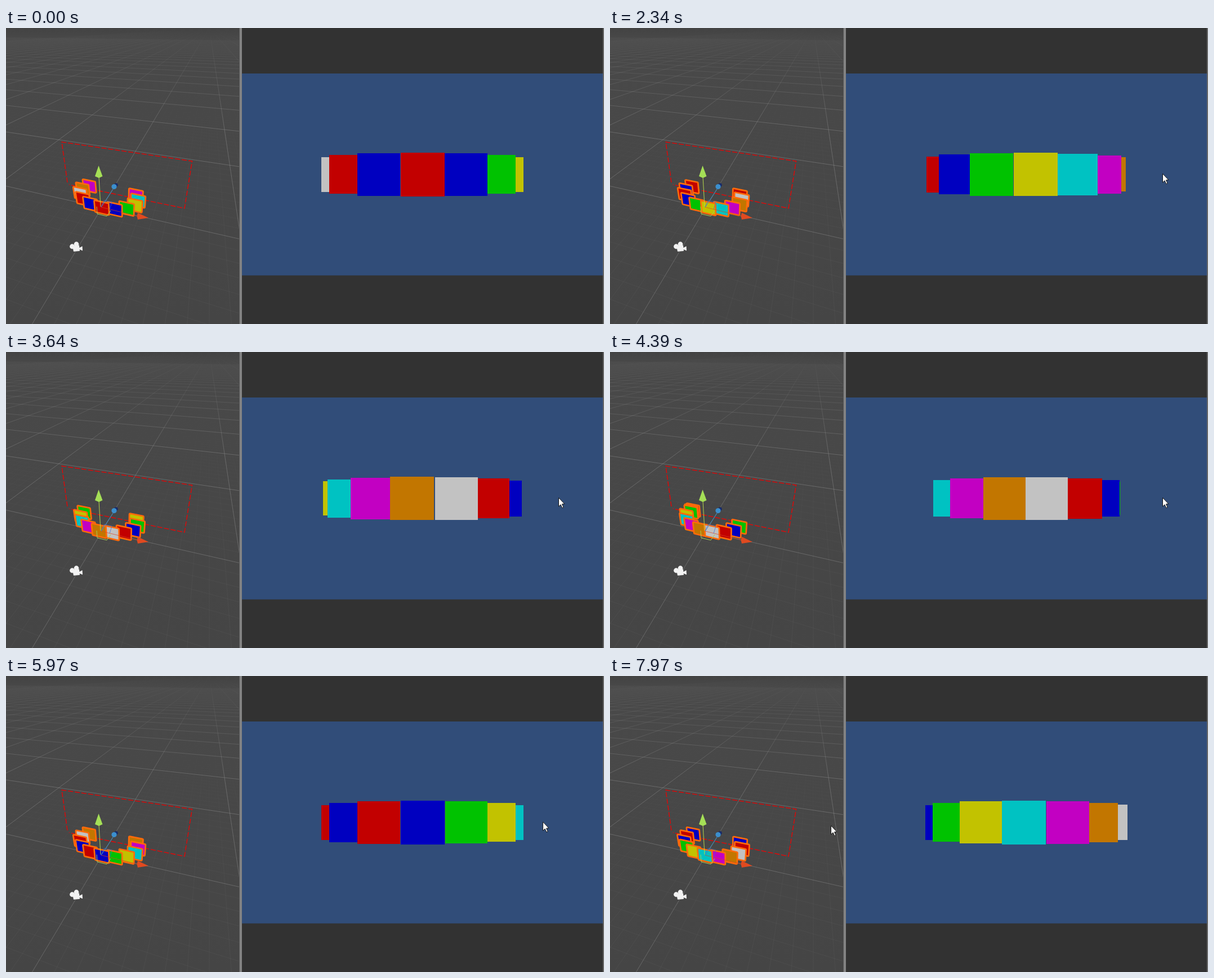
Animation, 1062 px wide and 527 px high, one loop 8 s. Source, as an HTML page with a canvas:

```html
<!DOCTYPE html>
<html lang="en">
<head>
<meta charset="utf-8">
<title>Card carousel</title>
<style>
html, body { margin: 0; width: 100%; height: 100%; overflow: hidden; background: #323232; }
canvas { display: block; }
</style>
</head>
<body>
<canvas id="stage" width="1062" height="527"></canvas>
<script>
const LOOP = 8000;
const ctx = document.getElementById('stage').getContext('2d');
const COLORS = ['#c20000', '#0000c0', '#00c200', '#c2c200', '#00c2c2', '#c200c2', '#c27600', '#c2c2c2'];
const RADIUS = 2.5, STEP = 24.3 * Math.PI / 180, SIDE = 5;

// The carousel turns at a steady rate, in hops of one or two slots
const RUNS = [
  { start: 1285, end: 4110, from: 0, to: 7.47, hop: 1 },
  { start: 4110, end: 5970, from: 7.47, to: 1, hop: 2 },
  { start: 5970, end: 6270, from: 1, to: 0, hop: 1 },
  { start: 6690, end: 8000, from: 0, to: 4.15, hop: 1 }
];
const ENTRY = { x: 968, y: 495 };
const MOVES = [
  { start: 120, end: 260, x: 958, y: 304 },
  { start: 490, end: 580, x: 981, y: 259 },
  { start: 5885, end: 6280, x: 392, y: 266 }
];

const clamp = (v, lo, hi) => Math.min(hi, Math.max(lo, v));
const mix = (a, b, k) => a + (b - a) * k;
const progress = (t, { start, end }) => clamp((t - start) / (end - start), 0, 1);

function path(c, pts, close) {
  c.beginPath();
  pts.forEach(([x, y], i) => i ? c.lineTo(x, y) : c.moveTo(x, y));
  if (close) c.closePath();
}

function line(c, pts, color, width = 1) {
  path(c, pts);
  c.strokeStyle = color;
  c.lineWidth = width;
  c.stroke();
}

function shape(c, pts, color) {
  path(c, pts, true);
  c.fillStyle = color;
  c.fill();
}

function disc(c, x, y, r, color) {
  c.beginPath();
  c.arc(x, y, r, 0, 7);
  c.fillStyle = color;
  c.fill();
}

// World to editor view
function project(x, y, z) {
  const w = 1 - .0149 * x + .0459 * z - .0326 * y;
  return [(170 + 18.5 * x + 16.57 * z - 6.78 * y) / w, (320 - 27.4 * y) / w];
}

function fade(c, from, to, alpha) {
  const g = c.createLinearGradient(0, from, 0, to);
  g.addColorStop(0, 'rgba(150,150,150,0)');
  g.addColorStop(1, `rgba(150,150,150,${alpha})`);
  return g;
}

function drawGrid(c) {
  const minor = fade(c, 100, 420, .08), major = fade(c, 4, 190, .42);
  const xVanish = -1239, zVanish = 361;
  for (let z = -12; z <= 300; z++) {
    const big = z % 10 === 0;
    if (!big && z > 40) continue;
    const [px, py] = project(0, 0, z);
    const slope = py / (px - xVanish);
    line(c, [[0, -slope * xVanish], [416, slope * (416 - xVanish)]], big ? major : minor);
  }
  for (let x = -200; x < 60; x++) {
    const big = x % 10 === 0;
    if (!big && x < -60) continue;
    const [px, py] = project(x, 0, 0);
    const k = 540 / py;
    line(c, [[zVanish, 0], [zVanish + (px - zVanish) * k, 540]], big ? major : minor);
  }
}

function makeBackdrop() {
  const back = document.createElement('canvas');
  back.width = 1062;
  back.height = 527;
  const c = back.getContext('2d');
  const rect = (x, y, w, h, color) => { c.fillStyle = color; c.fillRect(x, y, w, h); };
  rect(0, 0, 1062, 527, '#323232');
  const g = c.createLinearGradient(0, 0, 0, 527);
  g.addColorStop(0, '#434343');
  g.addColorStop(.04, '#494949');
  g.addColorStop(1, '#454545');
  rect(0, 0, 415, 527, g);
  c.save();
  c.beginPath();
  c.rect(0, 0, 415, 527);
  c.clip();
  drawGrid(c);
  c.restore();
  rect(414, 0, 1, 527, '#555');
  rect(415, 0, 4, 527, '#838383');
  rect(419, 81, 641, 359.5, '#314d79');
  rect(1060, 0, 2, 527, '#6a6a6a');
  return back;
}

const backdrop = makeBackdrop();

// Current hop: slot a to slot b, k of the way
function turn(t) {
  const run = RUNS.filter(r => t >= r.start).pop() || RUNS[0];
  const { from, to, hop } = run;
  const pos = mix(from, to, progress(t, run));
  const base = Math.min(from, to);
  const low = base + hop * Math.floor((pos - base) / hop);
  const [a, b] = to > from ? [low, low + hop] : [low + hop, low];
  return { pos, a, b, k: Math.abs(pos - a) / hop };
}

function slot(offset) {
  const angle = STEP * clamp(offset, -SIDE, SIDE);
  return { x: RADIUS * Math.sin(angle), z: RADIUS * (1 - Math.cos(angle)) };
}

// Cards slide straight from one slot to the next, cutting the arc
function layout(t) {
  const { pos, a, b, k } = turn(t);
  const target = k < .1 ? a : b;
  const last = Math.min(target, Math.round(pos)) + SIDE;
  const cards = [];
  for (let i = target - SIDE; i <= last; i++) {
    const p = slot(i - a), q = slot(i - b);
    cards.push({
      x: mix(p.x, q.x, k),
      z: mix(p.z, q.z, k),
      color: COLORS[(i < 0 ? i + 10 : i) % COLORS.length]
    });
  }
  return cards.sort((m, n) => n.z - m.z);
}

function drawGame(cards) {
  for (const { x, z, color } of cards) {
    const size = 546 / (7 + z);
    const left = Math.round(739.5 + x * size - size / 2);
    const right = Math.round(739.5 + x * size + size / 2);
    const top = Math.round(260.7 - size / 2), bottom = Math.round(260.7 + size / 2);
    ctx.fillStyle = color;
    ctx.fillRect(left, top, right - left, bottom - top);
  }
}

function drawFrustum() {
  ctx.setLineDash([9, 3]);
  line(ctx, [[109, 275], [99, 203], [330.5, 237], [317, 321], [112, 279]], '#f00000', 1.3);
  ctx.setLineDash([]);
}

function drawScene(cards) {
  drawFrustum();
  ctx.lineJoin = 'round';
  for (const { x, z, color } of cards) {
    const half = .54;
    const quad = [[-half, half], [half, half], [half, -half], [-half, -half]]
      .map(([dx, dy]) => project(x + dx, dy, z * .6));
    path(ctx, quad, true);
    ctx.strokeStyle = '#ff6a0a';
    ctx.lineWidth = 5.5;
    ctx.stroke();
    shape(ctx, quad, color);
  }
  ctx.lineJoin = 'miter';
}

function drawGizmo() {
  line(ctx, [[168, 318], [165, 265]], '#b6d84c');
  line(ctx, [[169, 319], [190, 287]], '#3d8fc8');
  line(ctx, [[169, 319], [234, 335]], 'rgba(220,70,35,.7)');
  line(ctx, [[169, 319], [174, 307], [188, 310], [184, 323]], 'rgba(60,110,220,.7)');
  line(ctx, [[161, 318], [162, 331], [179, 335], [186, 325]], '#a9cf55');
  shape(ctx, [[164.5, 245], [171.5, 264], [165, 267], [158, 264]], '#a5df56');
  shape(ctx, [[253, 338], [234, 329], [232.5, 335], [234, 341]], '#e04a20');
  disc(ctx, 195.5, 279.5, 3.2, '#16296a');
  disc(ctx, 192, 282.5, 4.6, '#3b8fcd');
}

function drawCameraIcon() {
  const white = '#f2f2f2';
  disc(ctx, 117.5, 389, 4.4, white);
  disc(ctx, 125, 385, 4.4, white);
  shape(ctx, [[118, 388], [130, 387], [131, 397], [120, 398]], white);
  shape(ctx, [[129, 392], [135.5, 388.5], [136, 396.5], [130, 394]], white);
}

function drawPointer(t) {
  if (t < MOVES[0].start) return;
  let { x, y } = ENTRY;
  for (const move of MOVES) {
    const k = progress(t, move) ** 2;
    x = mix(x, move.x, k);
    y = mix(y, move.y, k);
  }
  const arrow = [[0, 0], [0, 15.5], [3.6, 12.2], [6.2, 18], [8.6, 17], [6, 11.3], [10.4, 11]]
    .map(([dx, dy]) => [x + .5 + dx, y + .5 + dy]);
  shape(ctx, arrow, '#fff');
  ctx.strokeStyle = '#161616';
  ctx.lineWidth = 1;
  ctx.stroke();
}

function draw(t) {
  const cards = layout(t);
  ctx.drawImage(backdrop, 0, 0);
  drawGame(cards);
  drawScene(cards);
  drawGizmo();
  drawCameraIcon();
  drawPointer(t);
}

const start = performance.now();
function tick() {
  draw((performance.now() - start) % LOOP);
  requestAnimationFrame(tick);
}
tick();
</script>
</body>
</html>
```
